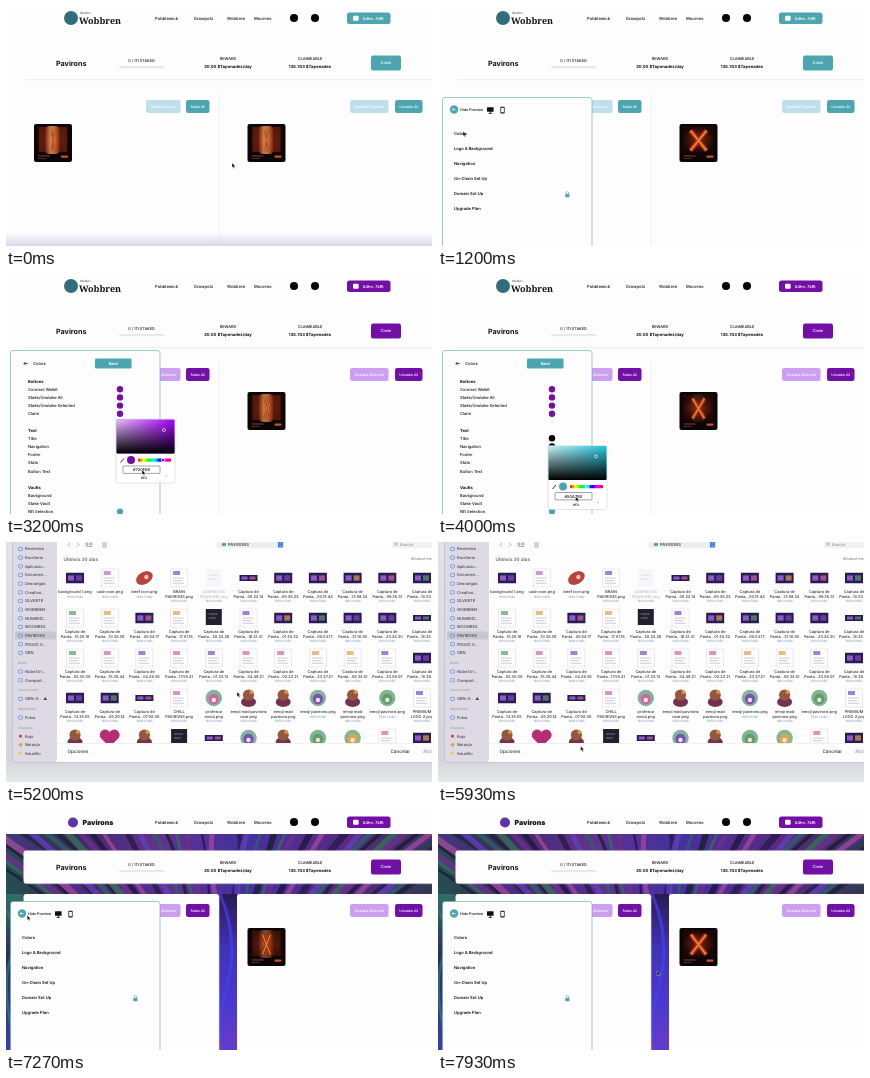
An HTML page that plays this animation: 426x240 px, repeating every 8000 ms.

```html
<!DOCTYPE html>
<html lang="en">
<head>
<meta charset="utf-8">
<title>Staking page editor</title>
<style>
html, body { margin: 0; width: 100%; height: 100%; overflow: hidden; background: #fdfdfe; }
svg { display: block; width: 100vw; height: 100vh; font-family: Inter, "Open Sans", sans-serif; text-rendering: geometricPrecision; }
</style>
</head>
<body>
<svg id="stage" viewBox="0 0 426 240" preserveAspectRatio="none"></svg>
<script>
const LOOP = 8000;
const TEAL = '#4da6af', PALE_TEAL = '#bfdfea', PURPLE = '#720fa6', PALE_PURPLE = '#cd9ff0', INK = '#111';
const stage = document.getElementById('stage');

// Markup helpers
const rect = (x, y, w, h, fill, r = 0, more = '') =>
  `<rect x="${x}" y="${y}" width="${w}" height="${h}" rx="${r}" fill="${fill}" ${more}/>`;
const dot = (x, y, r, fill, more = '') => `<circle cx="${x}" cy="${y}" r="${r}" fill="${fill}" ${more}/>`;
const path = (d, stroke, width = .8, more = '') =>
  `<path d="${d}" fill="none" stroke="${stroke}" stroke-width="${width}" ${more}/>`;
const text = (x, y, s, size, { w = 500, fill = INK, a = 'start', more = '' } = {}) =>
  `<text x="${x}" y="${y}" font-size="${size}" font-weight="${w}" fill="${fill}" text-anchor="${a}" ${more}>${s}</text>`;
const mid = (x, y, s, size, opt = {}) => text(x, y, s, size, { ...opt, a: 'middle' });
const group = (id, body, more = '') => `<g id="${id}" ${more}>${body}</g>`;
const button = (x, y, w, h, label, cls, size = 3.5) =>
  rect(x, y, w, h, TEAL, 2.2, `class="${cls}"`) +
  mid(x + w / 2, y + h / 2 + size * .36, label, size, { fill: '#fff', w: 500 });

function seeded(seed) {
  return () => (seed = (seed * 16807) % 2147483647) / 2147483647;
}

function backdrop() {
  const rnd = seeded(77);
  const colors = ['#1c2030', '#35705a', '#6b2f8f', '#221540', '#a0459f', '#4a2f8c', '#2a1b4e', '#5e40b8', '#2f5f6a'];
  let out = rect(0, 24, 426, 216, 'url(#sky)');
  // long leaves fanning out from the middle of the page
  for (let i = 0; i < 46; i++) {
    const x = i * 9.5, lean = (x - 215) * .35, bend = -10 + rnd() * 20;
    out += path(`M${x + lean} 14Q${x + bend} 50 ${x - lean * .7} 96`, colors[i % colors.length], 2 + rnd() * 5, 'opacity=".8"');
  }
  return out + rect(213, 84, 18, 156, 'url(#gap)') + rect(0, 84, 17, 156, 'url(#edge)') +
    path('M214 84Q234 130 220 180T226 240', '#4a3fe8', 3, 'opacity=".7"') +
    path('M0 100Q13 120 4 150T10 240', '#2c7f7a', 2.5, 'opacity=".7"');
}

function artCard(x) {
  return rect(x, 118, 38, 38, '#0c0505', 2) +
    rect(x + 3, 120, 32, 27, 'url(#glow)') +
    `<g class="core">` + rect(x + 5, 121, 28, 25, '#6b1f0f', 1) + rect(x + 11.5, 120, 14, 28, 'url(#ember)', 4) + '</g>' +
    `<g transform="translate(${x + 19} 134.5)"><g class="spin">` +
    path('M-8 -10L8 10M8 -10L-8 10', '#a52a0c', 5) +
    path('M-8 -10L8 10M8 -10L-8 10', '#f0823a', 2) + '</g></g>' +
    path(`M${x + 4} 150h12`, '#b54a30', .8) + path(`M${x + 4} 152.5h8`, '#77493f', .6) +
    rect(x + 27, 149.5, 7, 2.2, '#c5532c', .6);
}

function header() {
  const nav = [[149, 'Pobblewick'], [188, 'Drawpotz'], [221, 'Wobbren'], [248, 'Moonrex']];
  return rect(0, 0, 426, 24, '#fdfdfe') +
    group('brandOld', dot(65, 12, 7, '#2f6f7c') + text(74, 7.6, 'Studios', 3, { fill: '#456' }) +
      text(73, 17.6, 'Wobbren', 9, { w: 800, more: 'font-family="Noto Serif, serif"' })) +
    group('brandNew', dot(67, 12.5, 5, '#5a35a8') + text(76.5, 15.2, 'Pavirons', 7, { w: 900 })) +
    nav.map(([x, s]) => text(x, 13.6, s, 4.2)).join('') +
    dot(288, 12, 4, '#000') + dot(309, 12, 4, '#000') +
    rect(341, 6.5, 43.5, 11.5, TEAL, 2.5, 'class="wallet"') +
    rect(347, 9.8, 5.6, 5, '#fff', 1) +
    text(356.5, 13.7, 'Q4hn..7kRt', 3.9, { fill: '#fff', w: 600 });
}

function page() {
  return rect(0, 0, 426, 240, '#fdfdfe') +
    group('backdrop', backdrop()) + header() +
    rect(17.5, 40.5, 420, 33, '#fdfdfe', 2.5) + path('M19 73.7h407', '#dbe0ea', .6) +
    text(50, 59.8, 'Pavirons', 7.2, { w: 700 }) +
    mid(135.5, 55.6, '0 / 111 STAKED', 3.8) + rect(113, 60, 45, 2.2, '#ece4f4', 1) +
    mid(222, 54.2, 'REWARD', 3.9) + mid(222, 62.4, '20.00 $Tapenades/day', 4.2, { w: 700 }) +
    mid(304, 54.2, 'CLAIMEABLE', 3.9) + mid(304, 62.4, '135.743 $Tapenades', 4.2, { w: 700 }) +
    button(365, 49.5, 30, 15, 'Claim', 'claim', 4) +
    rect(17.5, 84, 195.5, 165, '#fdfdfe', 2.5) + rect(231, 84, 205, 165, '#fdfdfe', 2.5) +
    path('M213 86v154', '#e6e9f2', .6) +
    button(140, 94, 34.5, 13, 'Stake Selected', 'some') + button(180, 94, 23.5, 13, 'Stake All', 'all') +
    button(344, 94, 38.5, 13, 'Unstake Selected', 'some') + button(389, 94, 27.5, 13, 'Unstake All', 'all') +
    artCard(28) + artCard(241.5) +
    group('floorShade', rect(0, 227, 426, 13, 'url(#floor)'));
}

const panelBox = y => rect(4.5, y, 149.5, 260, '#fdfdfe', 2.5, 'stroke="#5aaab4" stroke-width=".6"');
const backArrow = y => path(`M22 ${y}h-4m1.7 -1.8l-1.8 1.8l1.8 1.8`, INK, .7);

function menuPanel() {
  const items = ['Colors', 'Logo &amp; Background', 'Navigation', 'On-Chain Set Up', 'Domain Set Up', 'Upgrade Plan'];
  return panelBox(91.5) + dot(16, 103.5, 4.2, TEAL) + path('M17.8 103.5h-3.6m1.5 -1.5l-1.5 1.5l1.5 1.5', '#fff', .6) +
    text(22, 104.9, 'Hide Preview', 3.7) +
    rect(49, 101.3, 6.6, 4.5, INK, .5) + path('M52.3 105v2.4m-1.7 0h3.4', INK, .8) +
    rect(62.4, 100.8, 4.2, 6.8, INK, .8) + rect(63.1, 101.8, 2.8, 4.5, '#fff') +
    items.map((s, i) => text(16, 129.4 + 15 * i, s, 4.1, { w: 600 })).join('') +
    rect(127.3, 188, 4.2, 3.2, TEAL, .5) + path('M128.1 188v-1a1.3 1.3 0 0 1 2.6 0v1', TEAL, .7);
}

const sections = [
  [107, 'Buttons', [['Connect Wallet', TEAL], ['Stake/Unstake All', TEAL], ['Stake/Unstake Selected', TEAL], ['Claim', TEAL]]],
  [156, 'Text', [['Title', '#000'], ['Navigation', '#000'], ['Footer', '#3f7fa2'], ['Stats', '#000'], ['Button Text', '#fff']]],
  [213, 'Vaults', [['Background', '#fff'], ['Stake Vault', '#fff'], ['Nft Selection', TEAL]]]
];

function colorsPanel() {
  const rows = sections.map(([y, title, items]) =>
    text(22, y + 1.5, title, 4.1, { w: 700 }) +
    items.map(([s, color], i) => {
      const cy = y + 8.2 * (i + 1);
      return text(22, cy + 1.5, s, 4.1) +
        dot(114, cy, color === '#fff' ? 1 : 3.2, color === '#fff' ? '#f1f1f3' : color, 'class="swatch"');
    }).join('')).join('');
  return panelBox(76.5) + backArrow(89.5) + text(27, 91, 'Colors', 4.1) +
    rect(89, 84.5, 36.5, 10, TEAL, 1.2) + mid(107.2, 91, 'Save', 4, { fill: '#fff', w: 700 }) + rows;
}

function picker() {
  return rect(0, 0, 59, 64, '#fff', 2, 'stroke="#bbb" stroke-width=".4"') +
    rect(.5, .5, 58, 34, TEAL, 1, 'id="tone"') +
    rect(.5, .5, 58, 34, 'url(#whiteFade)', 1) + rect(.5, .5, 58, 34, 'url(#blackFade)', 1) +
    dot(48, 11, 1.5, 'none', 'id="pick" stroke="#fff" stroke-width=".6"') +
    path('M4.5 43.5l3.5 -4', '#333', 1) + dot(15, 41, 4, TEAL, 'id="sample"') +
    rect(22, 39.5, 33, 3.2, 'url(#hue)', 1.2) + dot(41, 41, 1.8, 'none', 'id="hueKnob" stroke="#fff" stroke-width=".8"') +
    rect(7, 47, 37, 7.4, '#fff', .8, 'stroke="#444" stroke-width=".5"') +
    mid(25.5, 52.2, '#50A7B0', 4, { more: 'id="hex"' }) + mid(28, 60, 'HEX', 3.2) + path('M49 57.5l1 -1l1 1', '#555', .4);
}

function logoPanel() {
  const slot = (y, title, size) => text(18, y, `${title} <tspan font-weight="400" fill="#777">${size}</tspan>`, 3.9, { w: 700 }) +
    rect(21, y + 5.5, 122, 30, '#fcf5f9', 2, 'stroke="#f0e4ee" stroke-width=".4" stroke-dasharray="1.5 1.5"');
  const small = (x, y, s, w) => rect(x, y, w, 10, '#fff', 1.2, 'stroke="#c9d8ea" stroke-width=".5"') +
    mid(x + w / 2, y + 6.4, s, 3.9, { fill: '#555' });
  return panelBox(91.5) + backArrow(105) + text(27, 103.6, 'Logo &amp;', 4.1) + text(27, 109.3, 'Background', 4.1) +
    rect(89, 99.5, 36.5, 10.5, PALE_TEAL, 1.2) + mid(107.2, 106.2, 'Save', 4, { fill: '#fff', w: 700 }) +
    slot(125.8, 'Header Logo', '(500px X 100px)') + slot(183.2, 'Background', '(1920px X 1080px)') +
    group('logoFile', rect(70, 138.2, 24, 7, '#fff') + dot(76, 141.7, 1.5, '#5a35a8') + text(79, 142.9, 'Pavirons', 2.8, { w: 900 }) +
      mid(82, 151.6, 'Capt...png', 4.8)) +
    group('backFile', rect(73, 194.8, 17, 9, 'url(#sky)') + path('M73 203Q79 193 90 197M75 196Q84 205 90 201', '#a33fa8', 1.6) +
      mid(82, 210.3, 'fond...png', 4.8) + small(97, 220.5, 'Delete', 20)) +
    small(121, 163, 'Save', 19) + small(121, 220.5, 'Save', 19);
}

function thumb(kind, x, y, rnd) {
  const tint = ['#7a4fc0', '#e0a24a', '#5f9e6a', '#c76aa8'][Math.floor(rnd() * 4)];
  switch (kind) {
    case 'L': {
      const h = rnd() < .3 ? 6 : 10.5;
      return rect(x - 9, y - h / 2, 18, h, '#2c1a52') + rect(x - 7, y - h / 4, 6, h / 2, '#8a5cc8') +
        rect(x + 1, y - h / 4, 6, h / 2, tint, 0, 'opacity=".7"');
    }
    case 'D': return rect(x - 8, y - 9, 16, 16, '#221f2e') + path(`M${x - 5} ${y - 4}h9m-9 4h7`, '#999', .7);
    case 'F': return rect(x - 8, y - 9, 16, 18, '#f8f6fa') + path(`M${x - 5} ${y - 3}h10m-10 4h8`, '#e5d9ec', 1);
    case 'R': return `<ellipse cx="${x}" cy="${y}" rx="9" ry="6" fill="#b8433f" transform="rotate(-30 ${x} ${y})"/>` + dot(x + 2, y - 1, 2.2, '#f2c3b5');
    case 'E': return dot(x, y, 8.2, '#82b596') + dot(x, y + 1, 5.2, tint) + dot(x, y + 2, 2.2, '#f0e7d8');
    case 'C': return `<ellipse cx="${x}" cy="${y + 4}" rx="7.5" ry="5" fill="#74324f"/>` + dot(x, y - 3, 5.6, '#96573f') + dot(x + 3, y - 6, 2, '#d89a45');
    case 'H': return `<path d="M${x} ${y + 9}l-9 -9a5 5 0 0 1 9 -6a5 5 0 0 1 9 6z" fill="#b52e74"/>`;
    default: return rect(x - 8.5, y - 9, 17, 18, '#fdfdfe', 0, 'stroke="#ccc" stroke-width=".4"') +
      rect(x - 6, y - 7, 7, 4, tint, 0, 'opacity=".7"') +
      path(`M${x - 6} ${y}h11m-11 2.6h9m-9 2.6h11`, '#aab', .6);
  }
}

function fileDialog() {
  const rnd = seeded(4321);
  const rows = ['LPRPFLLLLLL', 'PPLPDPLLLLL', 'PPPPPPPPPPL', 'LLLPECCECEP', 'CHCDLECEEPL'];
  const names = {
    '0,0': ['background 1.png'], '0,1': ['cash icon.png'], '0,2': ['beef icon.png'],
    '0,3': ['BRAIN', 'PAVIRONS.png'], '0,4': ['CAMISETAS', 'PAVIRONS.png'],
    '3,3': ['CHILL', 'PAVIRONS.png'], '3,4': ['profesca', 'emoji.png'], '3,5': ['emoji mad pavirons', 'near.png'],
    '3,6': ['emoji mad', 'pavirons.png'], '3,7': ['emoji pavirons.png'], '3,8': ['emoji mad', 'pavirons.png'],
    '3,9': ['emoji pavirons.png'], '3,10': ['PREMIUM', 'LOGO 2.png']
  };
  const two = n => String(Math.floor(rnd() * n)).padStart(2, '0');
  let files = '';
  rows.forEach((kinds, r) => [...kinds].forEach((kind, c) => {
    const x = 69 + 34.7 * c, y = 36 + 40 * r;
    const label = names[[r, c]] || ['Captura de', `Panta…${two(24)}.${two(60)}.${two(60)}`];
    const fill = kind === 'F' ? '#bbb' : '#333';
    files += thumb(kind, x, y, rnd);
    label.forEach((s, i) => files += mid(x, y + 15.4 + 4.7 * i, s, 3.9, { fill }));
    files += mid(x, y + 15.4 + 4.5 * label.length, '1920×1080', 3.1, { fill: '#8a9cc0' });
  }));

  const side = ['Recientes', 'Escritorio', 'Aplicacio…', 'Documen…', 'Descargas', 'Creativo…', 'OLVARTE', 'WOBBREN', 'NUMERIC…',
    'MOONREX', 'PAVIRONS', 'FROGS O…', 'GBN', '#Nube', 'Nube Dri…', 'Compart…', '#Ubicaciones', 'GBN-G… ▲', '#Multimedia', 'Fotos', '#Etiquetas', 'Rojo', 'Naranja', 'Amarillo'];
  const tags = { Rojo: '#e5483f', Naranja: '#ee9a35', Amarillo: '#efcb3c' };
  let y = -1.6;
  const sidebar = side.map(s => {
    const heading = s[0] === '#';
    y += heading ? 10 : 8.65;
    if (heading) return text(12, y + 1.2, s.slice(1), 3.3, { fill: '#a5a2ae', w: 600 });
    const icon = tags[s] ? dot(14.5, y, 1.7, tags[s]) : rect(12.5, y - 1.6, 4, 3.2, 'none', .6, 'stroke="#3f83dd" stroke-width=".6"');
    return (s === 'PAVIRONS' ? rect(9, y - 4, 41, 8, '#c9c6d2', 1.5) : '') + icon + text(19, y + 1.4, s, 4, { fill: '#444' });
  }).join('');

  return rect(0, 0, 426, 240, 'url(#dim)') + rect(6, -4, 430, 225, '#c6c7cd', 3) + rect(7, -4, 430, 224, '#fdfdfe', 3) +
    rect(7, -4, 44, 224, '#dddae5', 3) + sidebar +
    path('M64 .7l-2 2l2 2M71 .7l2 2l-2 2', '#888', .7) +
    path('M80 1h2v2h-2zM84 1h2v2h-2zM80 4.5h6M96 1h5M96 3h5M96 5h5', '#777', .6) +
    rect(211, -4, 67, 10, '#eeeef1', 1.5) + rect(216, 1, 4, 3, '#45a1e4', .5) +
    text(222, 4, 'PAVIRONS', 4.2, { fill: '#333' }) + rect(272, -1, 5, 6.5, '#337ff0', 1) + path('M273.3 1.5l1.2 -1l1.2 1m-2.4 1.7l1.2 1l1.2 -1', '#fff', .5) +
    rect(386, -4, 50, 10, '#f1f1f3', 1.5) + dot(390, 2, 1.3, 'none', 'stroke="#777" stroke-width=".5"') + text(394, 4, 'Buscar', 4, { fill: '#999' }) +
    text(57.5, 18.6, 'Últimos 30 días', 4.6, { w: 600, fill: '#666' }) + text(405, 18.4, 'Mostrar menos', 3.8, { fill: '#888' }) +
    `<g clip-path="url(#fileArea)">${files}</g>` +
    rect(51, 201.5, 386, 18.5, '#fdfdfe') + path('M51 201.5h386', '#ddd', .4) +
    text(61.5, 211.2, 'Opciones', 4.6, { fill: '#333' }) + text(384.5, 211.2, 'Cancelar', 4.6, { fill: '#333' }) +
    text(417, 211.2, 'Abrir', 4.6, { fill: '#999' });
}

const gradient = (id, stops, vertical) => `<linearGradient id="${id}" x2="${vertical ? 0 : 1}" y2="${vertical ? 1 : 0}">` +
  stops.map(([o, c, a = 1]) => `<stop offset="${o}" stop-color="${c}" stop-opacity="${a}"/>`).join('') + '</linearGradient>';

stage.innerHTML = '<defs>' +
  gradient('sky', [[0, '#23504f'], [.14, '#3a2a58'], [.35, '#63318a'], [.55, '#4432a0'], [.8, '#5a2a80'], [1, '#2f3a50']]) +
  gradient('gap', [[0, '#2a1a55'], [.35, '#3f33b8'], [.7, '#4a38d0'], [1, '#6a3cc4']], true) +
  gradient('edge', [[0, '#2f7068'], [.4, '#2a2f58'], [1, '#3a3fb0']], true) +
  gradient('floor', [[0, '#e4e5f0', 0], [.3, '#e4e5f0', .6], [1, '#d6d8e4']], true) +
  gradient('dim', [[0, '#e2e3e8'], [.9, '#d3d5da'], [1, '#e6e7ea']], true) +
  gradient('ember', [[0, '#8f3214'], [.35, '#f0a060'], [.65, '#e98a48'], [1, '#8f3214']]) +
  gradient('whiteFade', [[0, '#fff', .75], [1, '#fff', 0]]) +
  gradient('blackFade', [[0, '#000', 0], [1, '#000']], true) +
  gradient('hue', ['#f00', '#ff0', '#0f0', '#0ff', '#00f', '#f0f', '#f00'].map((c, i) => [i / 6, c])) +
  '<radialGradient id="glow"><stop stop-color="#7a2810"/><stop offset="1" stop-color="#180705"/></radialGradient>' +
  '<clipPath id="fileArea"><rect x="51" y="20" width="386" height="181"/></clipPath></defs>' +
  group('page', page()) + group('menu', menuPanel()) + group('colors', colorsPanel()) + group('logo', logoPanel()) +
  group('picker', picker()) + group('dialog', fileDialog()) +
  group('cursor', '<path d="M0 0v4.6l1.1 -1l.8 1.8l.9 -.4l-.8 -1.7h1.5z" fill="#000" stroke="#fff" stroke-width=".35"/>');

const byId = id => document.getElementById(id);
const show = (id, on) => byId(id).setAttribute('display', on ? 'inline' : 'none');
const paint = (cls, color) => stage.querySelectorAll('.' + cls).forEach(e => e.setAttribute('fill', color));
const swatches = stage.querySelectorAll('.swatch');

// Timeline
const views = [[0, ''], [730, 'menu'], [1400, 'colors'], [4400, 'menu'], [4600, 'logo'], [7270, 'menu']];
// open, recolour, close, swatch index, picker top
const picks = [[1530, 1730, 1870, 0, 120], [1930, 2130, 2270, 1, 128], [2470, 2670, 2870, 2, 136],
  [2970, 3200, 3400, 3, 145], [3670, 4130, 4270, 11, 171.5]];
const dialogs = [[4870, 5470], [5870, 6200]];
const LOGO_SET = 5600, BACK_SET = 6330;
const cursorPath = [[0, 226, 157], [400, 120, 190], [700, 16, 200], [950, 16, 150], [1200, 25, 125.5], [1400, 25, 126],
  [1530, 114, 115], [1730, 133, 180], [1900, 114, 123], [2130, 136, 180], [2400, 113, 131], [2650, 136, 188], [2920, 114, 139],
  [3200, 136, 196], [3600, 114, 237], [3850, 137, 222], [4100, 138, 223], [4320, 107, 90], [4420, 20, 90], [4580, 30, 143],
  [4850, 82, 145], [5200, 231, 150], [5450, 420, 210], [5650, 131, 168], [5850, 82, 203], [6150, 420, 210], [6330, 131, 225],
  [6600, 54, 154], [6950, 54, 154], [7250, 20, 105], [7600, 140, 140], [7930, 219, 161], [8000, 219, 161]];
const spinWidth = [[0, .2], [600, .6], [1200, 1], [1800, .3], [2400, .8], [3200, .25], [4000, .75], [5300, 1], [6600, .2], [7300, .5], [7930, .95], [8000, .95]];

function sample(keys, t) {
  const i = Math.max(1, keys.findIndex(k => k[0] >= t));
  const a = keys[i - 1], b = keys[i];
  const p = (t - a[0]) / (b[0] - a[0]), e = p * p * (3 - 2 * p);
  return a.slice(1).map((v, n) => v + (b[n + 1] - v) * e);
}

function render(t) {
  const view = views.filter(v => v[0] <= t).pop()[1];
  ['menu', 'colors', 'logo'].forEach(id => show(id, id === view));
  show('floorShade', !view);
  const done = picks.map(p => t >= p[1]);
  paint('wallet', done[0] ? PURPLE : TEAL);
  paint('some', done[1] ? PALE_PURPLE : PALE_TEAL);
  paint('all', done[2] ? PURPLE : TEAL);
  paint('claim', done[3] ? PURPLE : TEAL);
  picks.forEach((p, i) => swatches[p[3]].setAttribute('fill', done[i] ? PURPLE : TEAL));

  const open = picks.find(p => t >= p[0] && t < p[2]);
  show('picker', open);
  if (open) {
    const set = t >= open[1];
    byId('picker').setAttribute('transform', `translate(110 ${open[4]})`);
    byId('tone').setAttribute('fill', set ? '#a800ff' : '#22c6dc');
    byId('sample').setAttribute('fill', set ? PURPLE : TEAL);
    byId('hueKnob').setAttribute('cx', set ? 47 : 39);
    byId('hex').textContent = set ? '#720FA6' : '#50A7B0';
  }

  const logoSet = t >= LOGO_SET, backSet = t >= BACK_SET;
  show('brandOld', !logoSet);
  show('brandNew', logoSet);
  show('logoFile', logoSet);
  show('backdrop', backSet);
  show('backFile', backSet);
  show('dialog', dialogs.some(([a, b]) => t >= a && t < b));

  // the art turns: seen edge-on it shows its bright core
  const [w] = sample(spinWidth, t);
  stage.querySelectorAll('.spin').forEach(e => e.setAttribute('transform', `scale(${w} 1)`));
  stage.querySelectorAll('.core').forEach(e => e.setAttribute('opacity', Math.max(0, 1 - w * 1.2)));
  const [x, y] = sample(cursorPath, t);
  byId('cursor').setAttribute('transform', `translate(${x} ${y})`);
}

const start = performance.now();
function tick() {
  render((performance.now() - start) % LOOP);
  requestAnimationFrame(tick);
}
tick();
</script>
</body>
</html>
```
